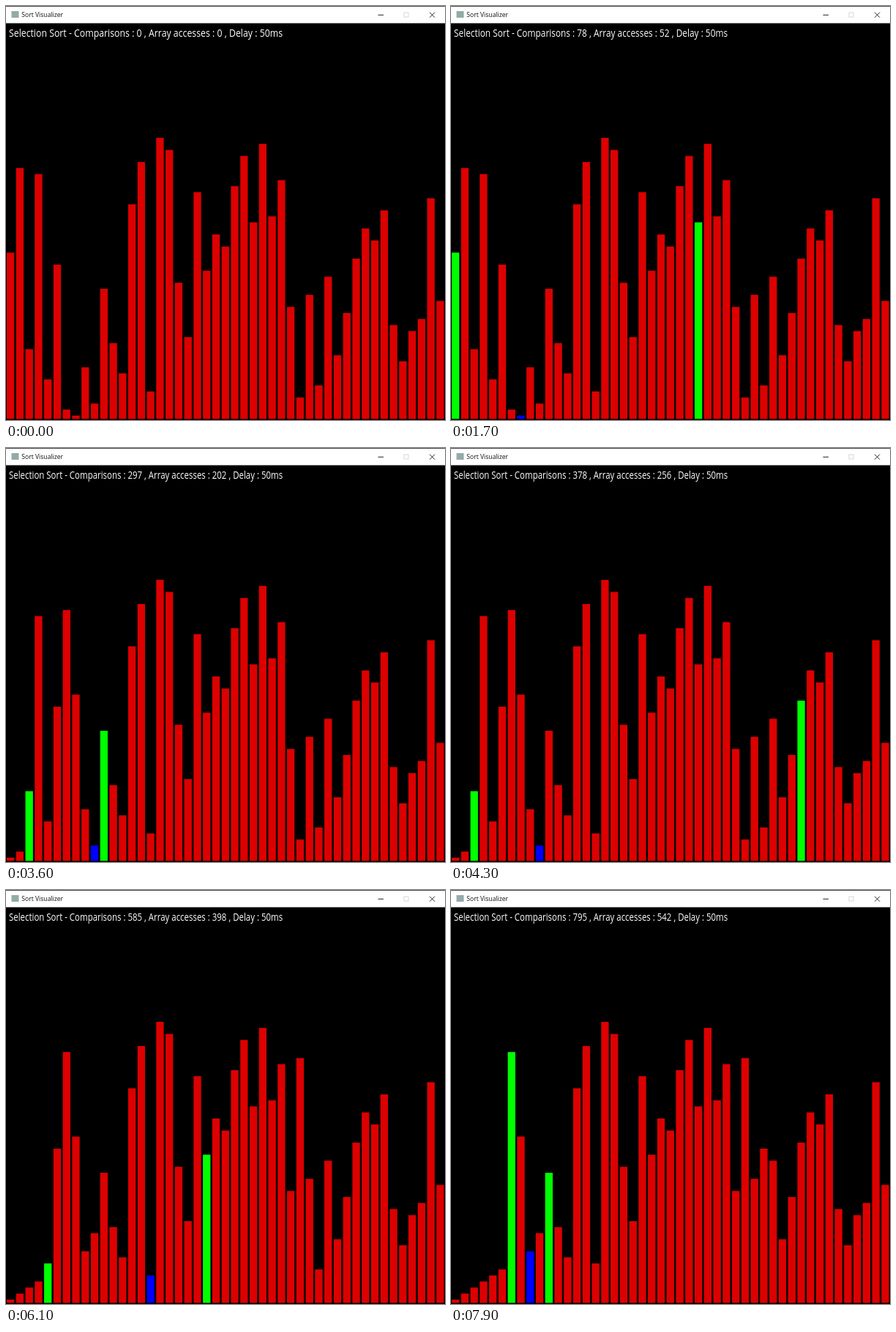
Write an HTML page that moves like this. It is 600 px wide and 565 px high and loops after 8000 ms.

```html
<!DOCTYPE html>
<html lang="en">
<head>
<meta charset="utf-8">
<title>Sort Visualizer</title>
<style>
  html, body { margin: 0; width: 100%; height: 100%; overflow: hidden; background: #000; }
  svg { display: block; width: 100vw; height: 100vh; }
  text { font-family: "Open Sans", "Noto Sans", sans-serif; white-space: pre; }
</style>
</head>
<body>
<svg viewBox="0 0 600 565">
  <rect width="600" height="565"/>
  <rect width="600" height="23.5" fill="#fff"/>
  <rect width="600" height="1" fill="#4a4a4a"/>
  <rect x="7.5" y="7" width="10" height="9" fill="#93aaa8"/>
  <text x="21.3" y="15" font-size="8.6" fill="#111">Sort Visualizer</text>
  <g fill="none" stroke="#222">
    <path d="M508.5 12.3h7.5"/>
    <rect x="544" y="9" width="6" height="6" stroke="#ccc" stroke-width=".8"/>
    <path d="M579 8.7l7 7m0-7l-7 7"/>
  </g>
  <g id="bars"></g>
  <text id="caption" font-size="14" fill="#fff"></text>
</svg>
<script>
const LOOP = 8000, TICK = 100;
const RED = '#dc0000', GREEN = '#00ff00', BLUE = '#0000ff';
const PITCH = 12.768, BAR_WIDTH = 10.3, FLOOR = 563.5, UNIT = 8.24;

const start = [
  27, 41, 11, 40, 6, 25, 1, 0, 8, 2, 21, 12, 7, 35, 42, 4,
  46, 44, 22, 13, 37, 24, 30, 28, 38, 43, 32, 45, 33, 39, 18, 3,
  20, 5, 23, 10, 17, 26, 31, 29, 34, 15, 9, 14, 16, 36, 19
];

const caption = document.getElementById('caption');
const bars = start.map((_, k) => {
  const bar = document.createElementNS('http://www.w3.org/2000/svg', 'rect');
  bar.setAttribute('x', (1 + k * PITCH).toFixed(2));
  bar.setAttribute('width', BAR_WIDTH);
  return document.getElementById('bars').appendChild(bar);
});

// State of the selection sort after a number of inner-loop steps.
function sortState(steps) {
  const list = [...start];
  if (steps <= 0) return { list, i: -1, j: -1, min: -1, swaps: 0 };
  let left = steps;
  for (let i = 0; i < list.length - 1; i++) {
    let min = i;
    for (let j = i + 1; j < list.length; j++) {
      if (list[j] < list[min]) min = j;
      if (--left === 0) return { list, i, j, min, swaps: i };
    }
    [list[i], list[min]] = [list[min], list[i]];
  }
}

function render(time) {
  const t = Math.floor(time / TICK) * TICK;
  const steps = Math.max(0, Math.floor(26.15 + 0.03855 * (t - 1700)));
  const { list, i, j, min, swaps } = sortState(steps);

  bars.forEach((bar, k) => {
    const height = 4.5 + list[k] * UNIT;
    bar.setAttribute('y', (FLOOR - height).toFixed(2));
    bar.setAttribute('height', height.toFixed(2));
    bar.setAttribute('fill', k === i || k === j ? GREEN : k === min ? BLUE : RED);
  });

  const comparisons = steps * 3, accesses = steps * 2 + swaps * 2;
  caption.textContent =
    `Selection Sort - Comparisons : ${comparisons} , Array accesses : ${accesses} , Delay : 50ms`;
  // The lettering condenses as the counters gain digits.
  const digits = `${comparisons}${accesses}`.length;
  const squeeze = 46.8 / (51.2 + digits);
  caption.setAttribute('transform', `translate(4 42.3) scale(${squeeze.toFixed(4)} 1)`);
}

const origin = performance.now();
function frame() {
  render((performance.now() - origin) % LOOP);
  requestAnimationFrame(frame);
}
frame();
</script>
</body>
</html>
```
